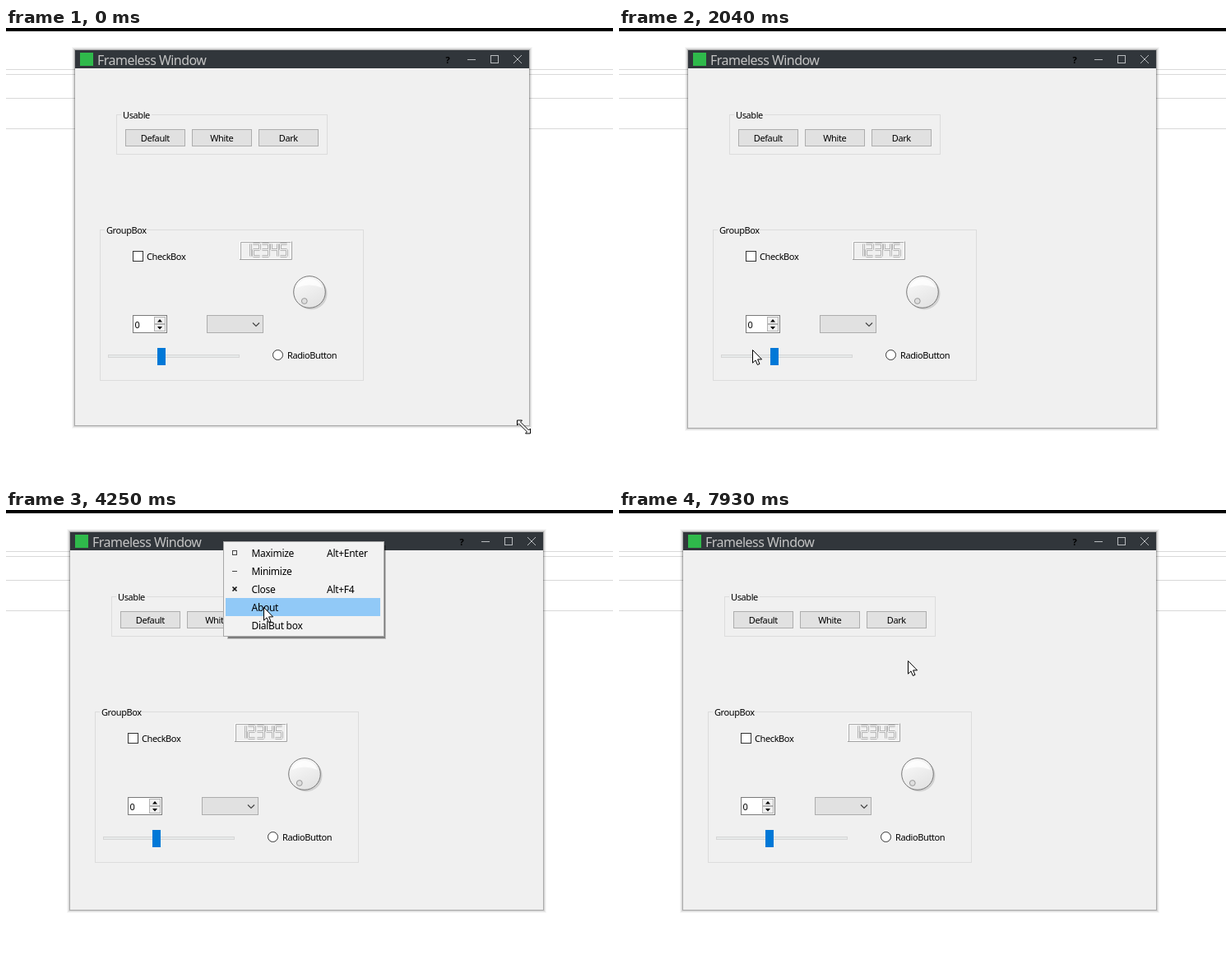
Write an HTML page that moves like this. It is 738 by 552 pixels and loops after 7.99 s.

```html
<!DOCTYPE html>
<html lang="en">
<head>
<meta charset="utf-8">
<title>Frameless Window</title>
<style>
html, body { margin: 0; width: 100%; height: 100%; overflow: hidden; background: #fff; }
svg { display: block; width: 738px; height: 552px; }
text { font: 11px "Noto Sans", "Open Sans", sans-serif; letter-spacing: -.4px; white-space: pre; }
.title { font-size: 16px; letter-spacing: -.53px; fill: #c4c4c4; }
.menu { font-size: 12px; letter-spacing: -.28px; }
.mid { text-anchor: middle; }
</style>
</head>
<body>
<svg id="stage" viewBox="0 0 738 552"></svg>
<script>
const LOOP = 7990, BAR = 22;

// [first change, last change, number of steps]
const BURSTS = [
  [680, 1440, 14], [1500, 2280, 14], [2340, 2520, 4], [2890, 3650, 14],
  [3830, 4250, 8], [4430, 5150, 13], [5330, 5330, 1], [5700, 6480, 13],
  [6540, 7320, 13], [7380, 7500, 3], [7750, 7930, 4]
];

// [time, right, bottom]
const CORNER = [
  [620, 636, 483], [1031, 605, 473], [1265, 697, 529], [1440, 663, 501], [1560, 653, 486]
];
// [time, left]
const LEFT = [[2830, 84], [3000, 66], [3180, 78]];
// [time, x, y]
const POINTER = [
  [1620, 646, 488], [2040, 162, 391], [2280, 94, 320], [2460, 79, 315], [2830, 79, 315],
  [3000, 61, 315], [3180, 73, 315], [3416, 208, 74], [3650, 264, 38], [3830, 264, 38],
  [4250, 313, 118], [4610, 313, 118], [5150, 494, 207], [5270, 494, 207], [5330, 495, 207],
  [5700, 495, 207], [6180, 370, 43], [6300, 370, 43], [6720, 412, 146], [6900, 412, 146],
  [7320, 465, 257], [7500, 442, 229], [7750, 442, 229], [7930, 351, 183]
];

const rect = (x, y, w, h, fill, stroke) =>
  `<rect x="${x}" y="${y}" width="${w}" height="${h}" fill="${fill}"` +
  (stroke ? ` stroke="${stroke}"` : "") + "/>";
const text = (x, y, s, cls = "") => `<text x="${x}" y="${y}" class="${cls}">${s}</text>`;
const line = (d, color, width = 1) =>
  `<path d="${d}" fill="none" stroke="${color}" stroke-width="${width}"/>`;

const button = (x, y, w, h, label) =>
  rect(x + .5, y + .5, w - 1, h - 1, "#e1e1e1", "#adadad") +
  text(x + w / 2 - .2, y + h / 2 + 4.5, label, "mid");

const groupBox = (x, y, w, h, label, gap) =>
  rect(x + .5, y + .5, w, h, "none", "#dcdcdc") +
  rect(x + 6, y, gap, 1, "#f0f0f0") + text(x + 8, y + 5, label);

const cross = (x, y) => line(`M${x - 5},${y - 5}l10,10m0,-10l-10,10`, "#b8bbbe");

function shadow(id) {
  return [.03, .05, .09, .2].map((a, i) =>
    `<rect class="${id}" data-grow="${4 - i}" fill="#000" fill-opacity="${a}"/>`).join("");
}

function lcd(x, y) {
  const segs = {
    a: "M0,0h8", b: "M8,0v7", c: "M8,7v8", d: "M0,15h8", e: "M0,7v8", f: "M0,0v7", g: "M0,7h8"
  };
  const digits = ["bc", "abged", "abgcd", "fgbc", "afgcd"].map((names, i) => {
    const d = [...names].map(n => segs[n]).join("");
    return `<g transform="translate(${x + 5.5 + 11 * i},${y + 3.5})">` +
      line(d, "#b4b4b4", 3) + line(d, "#f4f4f4") + "</g>";
  }).join("");
  return line(`M${x + .5},${y + 23}v-22.5h63`, "#fff") +
    line(`M${x + 1.5},${y + 22}v-20.5h61`, "#a8a8a8") +
    line(`M${x + 2},${y + 21.5}h60.5v-20`, "#fff") +
    line(`M${x},${y + 22.5}h63.5v-22`, "#a0a0a0") + digits;
}

const dial =
  `<circle cx="371" cy="323" r="19.5" fill="#000" fill-opacity=".13"/>
   <circle cx="369" cy="321" r="19.3" fill="url(#knob)" stroke="#777"/>
   <path d="M353,316a17,17 0 0 1 32,0q-16,-7 -32,0z" fill="#fff" fill-opacity=".75"/>
   <circle cx="362.8" cy="332" r="3.4" fill="#dedede" stroke="#999"/>`;

const spinBox =
  rect(154.5, 349.5, 41, 21, "#fff", "#7a7a7a") + text(156.5, 365, "0") +
  rect(180.5, 351.5, 13, 8, "#f0f0f0", "#b4b4b4") +
  rect(180.5, 360.5, 13, 8, "#f0f0f0", "#b4b4b4") +
  `<path d="M184,357.5h6l-3,-3.5zM184,363h6l-3,3.5z"/>`;

const content =
  groupBox(134, 105, 256, 48, "Usable", 37) +
  button(145, 123, 73, 21, "Default") + button(226, 123, 73, 21, "White") +
  button(307, 123, 73, 21, "Dark") +
  groupBox(114, 245, 320, 183, "GroupBox", 51) +
  rect(154.5, 271.5, 12, 12, "#fff", "#333") + text(171, 282, "CheckBox") +
  lcd(284, 259) + dial + spinBox +
  rect(244.5, 349.5, 68, 21, "#e1e1e1", "#adadad") +
  line("M300,358.5l4,4 4,-4", "#444", 1.2) +
  rect(124.5, 397.5, 159, 3, "#e7eaea", "#d6d6d6") +
  rect(184, 389, 10, 21, "#0078d7") +
  `<circle cx="330.5" cy="397.5" r="6" fill="#fff" stroke="#333"/>` +
  text(342, 402, "RadioButton") +
  rect(90, 30, 16, 16, "#2fb94b") + text(111, 45, "Frameless Window", "title");

// Drawn leftwards from the window's right edge.
const controls =
  `<text x="-101.5" y="43" style="font-weight:700">?</text>` +
  line("M-75,38.5h10", "#b8bbbe") +
  rect(-46.5, 33.5, 9, 9, "none", "#b8bbbe") + cross(-14, 38);

const items = [["Maximize", "Alt+Enter"], ["Minimize"], ["Close", "Alt+F4"], ["About"], ["DialBut box"]];
const menu =
  rect(5, 5, 193, 114, "#000").replace("/>", ' fill-opacity=".2"/>') +
  rect(6, 5, 191, 113, "#000").replace("/>", ' fill-opacity=".35"/>') +
  rect(.5, .5, 195, 115, "#f2f2f2", "#a8a8a8") +
  `<rect id="hover" x="3" width="188" height="22" fill="#91c9f7"/>` +
  rect(11.5, 11.5, 5, 5, "none", "#444") + line("M11,36.5h6", "#444") +
  line("M11.5,55.5l5,5m0,-5l-5,5", "#111", 1.6) +
  items.map(([name, key], i) =>
    text(34.5, 19 + 22 * i, name, "menu") + (key ? text(126, 19 + 22 * i, key, "menu") : "")).join("");

function dialog(id, x, y, w, h, title, body = "") {
  const glow = [.03, .05, .09, .2].map((a, i) => {
    const g = 4 - i;
    return `<rect x="${-g}" y="${-g}" width="${w + 2 * g}" height="${h + 2 * g}" fill-opacity="${a}"/>`;
  }).join("");
  return `<g id="${id}" transform="translate(${x},${y})">${glow}` +
    rect(0, 0, w, h, "#f0f0f0") + rect(0, 0, w, BAR, "#31363b") +
    `<rect class="hot" x="${w - 28}" width="28" height="${BAR}" fill="#54595e"/>` +
    cross(w - 14, 11) + text(6, 17, title, "title") + body + "</g>";
}

const stage = document.getElementById("stage");
stage.innerHTML = `
  <defs><linearGradient id="knob" x1=".2" y1="0" x2=".7" y2="1">
    <stop stop-color="#fafafa"/><stop offset="1" stop-color="#e2e2e2"/>
  </linearGradient></defs>` +
  rect(0, 0, 738, 552, "#fff") + rect(0, 0, 738, 4, "#000") +
  [50, 56, 85, 122].map(y => rect(0, y, 738, 1, "#d9d9d9")).join("") +
  shadow("glow") +
  `<rect id="body" y="27" fill="#f0f0f0"/><rect id="bar" y="27" height="${BAR}" fill="#31363b"/>
   <g id="content">${content}</g><g id="controls">${controls}</g>` +
  dialog("about", 234, 190, 273, 143, "About") +
  dialog("choice", 285, 217, 174, 89, "DialBut box",
    button(9, 57, 75, 23, "OK") + button(90, 57, 75, 23, "Cancel")) +
  `<g id="menu">${menu}</g>
   <path id="arrow" d="M.5,.5V16.2L4,12.9 6.4,18.5 9,17.4 6.6,11.9H11.6Z" fill="#fff" stroke="#000"/>
   <path id="sizer" d="M-8,-8h6l-2,2 10,10 2,-2v6h-6l2,-2 -10,-10 -2,2z" fill="#fff" stroke="#000"/>`;

const el = id => document.getElementById(id);
const set = (node, attrs) => { for (const k in attrs) node.setAttribute(k, attrs[k]); };
const show = (node, on) => node.setAttribute("visibility", on ? "inherit" : "hidden");
const move = (node, x, y, extra = "") => set(node, { transform: `translate(${x},${y})${extra}` });
const glows = [...document.querySelectorAll(".glow")];

// Snap time to the last moment the picture changed.
function snap(t) {
  let out = 0;
  for (const [start, end, n] of BURSTS) {
    if (t < start) break;
    const step = n > 1 ? (end - start) / (n - 1) : 0;
    out = step ? start + step * Math.min(n - 1, Math.floor((t - start) / step + .15)) : start;
  }
  return out;
}

// Monotone cubic interpolation of column c.
function at(keys, t, c) {
  const last = keys.length - 1;
  if (t <= keys[0][0]) return keys[0][c];
  if (t >= keys[last][0]) return keys[last][c];
  const i = keys.findIndex(k => k[0] > t) - 1;
  const rate = j => j < 0 || j >= last ? 0 : (keys[j + 1][c] - keys[j][c]) / (keys[j + 1][0] - keys[j][0]);
  const slope = j => {
    const a = rate(j - 1), b = rate(j);
    return a * b > 0 ? 2 * a * b / (a + b) : 0;
  };
  const h = keys[i + 1][0] - keys[i][0], p = (t - keys[i][0]) / h, q = 1 - p;
  return keys[i][c] * q * q * (1 + 2 * p) + keys[i + 1][c] * p * p * (1 + 2 * q) +
    h * p * q * (slope(i) * q - slope(i + 1) * p);
}

function render(now) {
  const t = snap(now);
  const left = Math.round(at(LEFT, t, 1));
  const right = Math.round(at(CORNER, t, 1)), bottom = Math.round(at(CORNER, t, 2));
  const width = right - left, height = bottom - 27;

  for (const r of glows) {
    const g = +r.dataset.grow;
    set(r, { x: left - g, y: 27 - g, width: width + 2 * g, height: height + 2 * g });
  }
  set(el("body"), { x: left, width, height });
  set(el("bar"), { x: left, width });
  move(el("content"), left - 84, 0);
  move(el("controls"), right, 0);

  const diagonal = t < 1620, sideways = t >= 2460 && t < 3220;
  const x = diagonal ? right - 6.5 : Math.round(at(POINTER, t, 1));
  const y = diagonal ? bottom + 2 : Math.round(at(POINTER, t, 2));
  show(el("arrow"), !diagonal && !sideways);
  show(el("sizer"), diagonal || sideways);
  move(el("arrow"), x, y);
  move(el("sizer"), x, y, sideways ? " rotate(-45)" : "");

  const first = t >= 3830 && t < 4430, second = t >= 6240 && t < 6840;
  const mx = first ? 264 : 370, my = first ? 38 : 43;
  const row = Math.floor((y - my - 3) / 22);
  show(el("menu"), first || second);
  move(el("menu"), mx, my);
  show(el("hover"), (first || second) && row >= 0 && row < 5 && x > mx + 2);
  set(el("hover"), { y: 3 + 22 * row });

  const about = t >= 4490 && t < 5700, choice = t >= 6900 && t < 7750;
  show(el("about"), about);
  show(el("choice"), choice);
  show(el("about").querySelector(".hot"), about && x >= 479 && y >= 190 && y < 212);
  show(el("choice").querySelector(".hot"), choice && x >= 431 && x < 459 && y >= 217 && y < 239);
}

const begin = performance.now();
function loop() {
  render((performance.now() - begin) % LOOP);
  requestAnimationFrame(loop);
}
render(0);
requestAnimationFrame(loop);
</script>
</body>
</html>
```
